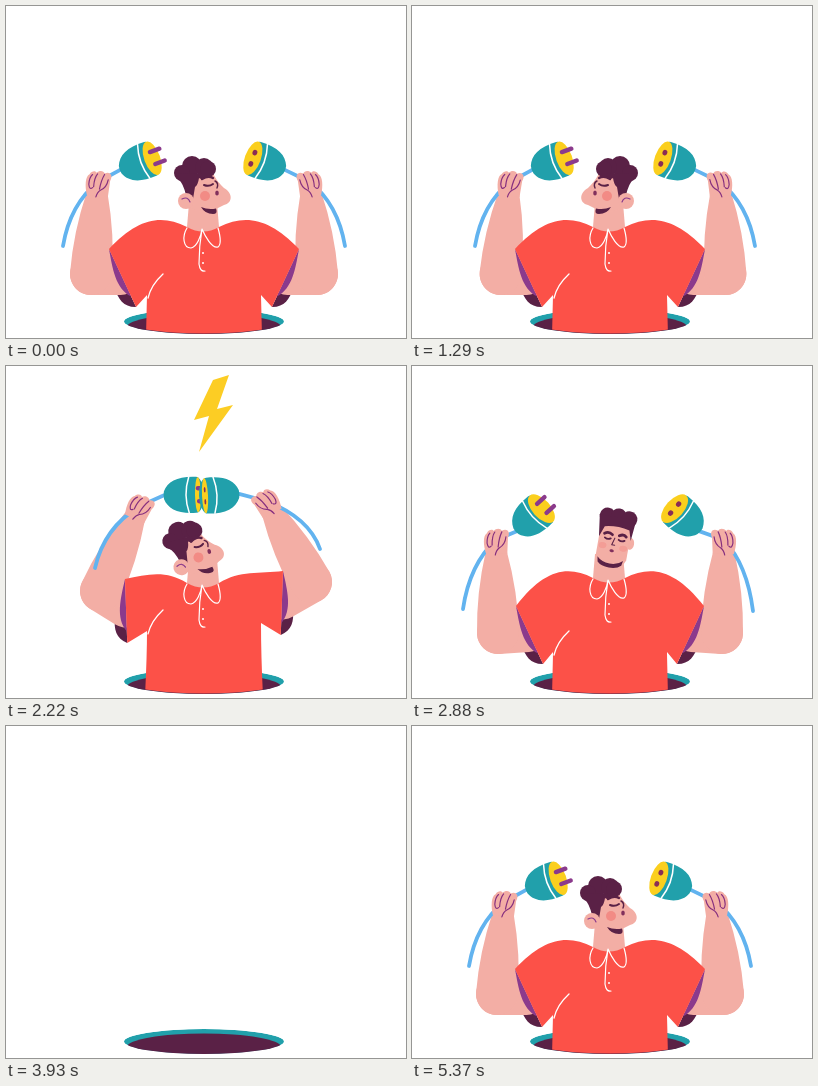
Write an HTML page that moves like this. It is 400x332 px and loops after 5.4 s.

```html
<!DOCTYPE html>
<html lang="en">
<head>
<meta charset="utf-8">
<title>Plug and socket</title>
<style>
html, body { margin: 0; width: 100%; height: 100%; overflow: hidden; background: #fff; }
svg { display: block; width: 100vw; height: 100vh; }
</style>
</head>
<body>
<svg id="stage" viewBox="0 0 400 332" fill="none" stroke-linecap="round" stroke-linejoin="round">
  <defs>
    <clipPath id="aboveHole"><path d="M-50 -200H450V315H278A80 12.5 0 0 1 118 315H-50Z"/></clipPath>
    <clipPath id="holeShape"><ellipse cx="198" cy="315.5" rx="80" ry="12.5"/></clipPath>
  </defs>
  <g id="hole" clip-path="url(#holeShape)">
    <ellipse cx="198" cy="315.5" rx="80" ry="12.5" fill="#21a0ab"/>
    <ellipse cx="198" cy="321" rx="77" ry="13.5" fill="#5a2146"/>
  </g>
  <g clip-path="url(#aboveHole)"><g id="man"></g></g>
  <polygon id="bolt" points="207,14 223,9 211,43 227,39 193,86 203,50 188,54" fill="#fccd24"/>
</svg>
<script>
const LOOP = 5400, STEP = 30, MID = 198;
const SKIN = '#f3aea5', RED = '#fc5148', TEAL = '#21a0ab', YELLOW = '#fbcf1e',
      BLUE = '#62b3ef', DARK = '#5a2146', PURPLE = '#8b3a8c';

// Each pose describes the left side; the right side mirrors it except for its overrides.
const POSES = {
  rest: {
    top: 215, half: 57, hem: 58,
    left: { hand: [92, 176], elbow: [85, 268], plug: [133, 157], tilt: -20, face: 8, cord: [57, 240], bend: 1, sleeve: [103, 243], cuff: 65 },
    right: { plug: [136, 157] }
  },
  join: {
    top: 211, half: 57, hem: 59,
    left: { hand: [134, 140], elbow: [95, 225], plug: [178, 129], tilt: -1, face: 3, cord: [89, 202], bend: 1, sleeve: [119, 213], cuff: 88 },
    right: { hand: [136, 135], elbow: [91, 216], plug: [183, 129], tilt: 3, cord: [82, 183], sleeve: [119, 205] }
  },
  droop: {
    top: 206, half: 57, hem: 58,
    left: { hand: [84, 174], elbow: [86, 267], plug: [119, 152], tilt: -42, face: 9, cord: [51, 243], bend: 1, sleeve: [104, 240], cuff: 65 },
    right: { plug: [123, 152], cord: [55, 245] }
  },
  rise: {
    top: 196, half: 57, hem: 65,
    left: { hand: [107, 160], elbow: [102, 247], plug: [143, 136], tilt: -50, face: 9, cord: [61, 206], bend: 0, sleeve: [118, 226], cuff: 71 },
    right: { hand: [104, 161], elbow: [100, 247], plug: [139, 136], cord: [57, 210] }
  },
  tuck: {
    top: 250, half: 36, hem: 36,
    left: { hand: [145, 217], elbow: [147, 310], plug: [182, 202], tilt: 10, face: 10, cord: [119, 286], bend: 1, sleeve: [163, 252], cuff: 89 },
    right: { hand: [133, 216], elbow: [134, 310], plug: [168, 207], tilt: 26, cord: [118, 281], sleeve: [152, 252] }
  },
  wide: {
    top: 204, half: 58, hem: 58,
    left: { hand: [62, 158], elbow: [75, 260], plug: [98, 125], tilt: -40, face: 8, cord: [20, 225], bend: 1, sleeve: [98, 238], cuff: 62 }
  }
};
for (const pose of Object.values(POSES)) pose.right = { ...pose.left, ...pose.right };

// time, pose, head turn, left sway, right sway, head lean, drop
const KEYS = [
  [0, 'rest', 1, 0, 0, 0, 0],
  [240, 'rest', 1, -3, 20, 0, 0],
  [540, 'rest', 1, 0, 0, 0, 0],
  [720, 'rest', -1, -18, 1, 0, 0],
  [900, 'rest', -1, -17, 1, 0, 0],
  [1140, 'rest', -1, 3, 4, 0, 0],
  [1290, 'rest', -1, 6, 4, 0, 0],
  [1380, 'rest', -1, 0, 0, 0, 0],
  [1560, 'join', 1, 0, 0, -15, 0],
  [2300, 'join', 1, 0, 0, -15, 0],
  [2460, 'droop', 0, 0, 8, 10, 0],
  [2700, 'droop', 0, 0, 0, 10, 0],
  [3420, 'droop', 0, 0, 0, 10, 0],
  [3540, 'rise', 0, 0, 0, 0, 0],
  [3600, 'rise', 0, 0, 0, 0, -4],
  [3750, 'tuck', 0, 0, 0, 0, 10],
  [3870, 'tuck', 0, 0, 0, 0, 170],
  [4560, 'tuck', -1, 0, 0, 0, 170],
  [4650, 'tuck', -1, 0, 0, 0, 0],
  [4770, 'wide', 1, 0, 0, 0, 0],
  [5100, 'rest', 1, 0, 0, 0, 0],
  [LOOP, 'rest', 1, 0, 0, 0, 0]
];

const byId = id => document.getElementById(id);
const clamp = v => Math.max(0, Math.min(1, v));
const smooth = v => v * v * (3 - 2 * v);
const rad = deg => deg * Math.PI / 180;
const shape = (d, fill) => `<path d="${d}" fill="${fill}"/>`;
const line = (d, color, width) => `<path d="${d}" stroke="${color}" stroke-width="${width}"/>`;
const dot = (x, y, rx, fill, ry = rx) => `<ellipse cx="${x}" cy="${y}" rx="${rx}" ry="${ry}" fill="${fill}"/>`;
const group = (transform, content) => `<g transform="${transform}">${content}</g>`;
const polar = ([x, y], deg, r) => [x + r * Math.cos(rad(deg)), y + r * Math.sin(rad(deg))];
const flip = ([x, y]) => [2 * MID - x, y];

// Blends numbers, points and nested poses alike.
function lerp(a, b, k) {
  if (typeof a === 'number') return a + (b - a) * k;
  if (Array.isArray(a)) return a.map((v, i) => lerp(v, b[i], k));
  return Object.fromEntries(Object.keys(a).map(key => [key, lerp(a[key], b[key], k)]));
}

function poseAt(t) {
  let i = 0;
  while (i < KEYS.length - 2 && t >= KEYS[i + 1][0]) i++;
  const [from, to] = [KEYS[i], KEYS[i + 1]];
  const k = smooth(clamp((t - from[0]) / (to[0] - from[0])));
  const pose = lerp(POSES[from[1]], POSES[to[1]], k);
  const [turn, swayLeft, swayRight, lean, drop] = lerp(from.slice(2), to.slice(2), k);
  return { ...pose, turn, swayLeft, swayRight, lean, drop };
}

// A limb segment with round ends; bulge swells its sides.
function taper([ax, ay], ra, [bx, by], rb, bulge = 0) {
  const len = Math.hypot(bx - ax, by - ay) || 1;
  const nx = (ay - by) / len, ny = (bx - ax) / len;
  const mx = (ax + bx) / 2, my = (ay + by) / 2, rm = (ra + rb) / 2 + bulge;
  return shape(`M${ax + nx * ra} ${ay + ny * ra}Q${mx + nx * rm} ${my + ny * rm} ${bx + nx * rb} ${by + ny * rb}` +
    `A${rb} ${rb} 0 0 0 ${bx - nx * rb} ${by - ny * rb}Q${mx - nx * rm} ${my - ny * rm} ${ax - nx * ra} ${ay - ny * ra}` +
    `A${ra} ${ra} 0 0 0 ${ax + nx * ra} ${ay + ny * ra}Z`, SKIN);
}

function limb(side, shift) {
  const move = ([x, y], k = 1) => [x + shift * k, y];
  const cuffEnd = polar(side.sleeve, side.cuff, 64);
  return { ...side, cuffEnd, hand: move(side.hand), elbow: move(side.elbow, .6),
    plug: move(side.plug), cord: move(side.cord), shoulder: lerp(side.sleeve, cuffEnd, .43) };
}

function arm(l) {
  const { sleeve: s, cuffEnd: e, cuff } = l;
  const bulge = (k, r) => polar(lerp(s, e, k), cuff + 90, r);
  const low = lerp(s, e, .82);
  const wrist = lerp(l.hand, l.elbow, .12);
  return shape(`M${s}C${bulge(.4, 8)} ${bulge(.85, 22)} ${e}Z`, DARK) +
    taper(l.elbow, 21, l.shoulder, 21) + taper(l.elbow, 21, wrist, 10.5, 5) +
    shape(`M${s}C${bulge(.3, 5)} ${bulge(.6, 11)} ${low}Z`, PURPLE);
}

function device(l, hasProngs) {
  const { hand: h, cord: c, plug: p, face } = l;
  const back = polar(p, l.tilt, -20);
  const control = lerp(lerp(h, c, .5), [lerp(c[0], h[0], .2), lerp(h[1], c[1], .35)], l.bend);
  const holeWidth = Math.min(face * .3, 2.5);
  const detail = hasProngs
    ? line('M14 -6.5H24M15 6.5H25', PURPLE, 4.4)
    : dot(14, -6, holeWidth, '#8a2d55', 2.8) + dot(14, 6, holeWidth, '#8a2d55', 2.8);
  return line(`M${back}L${h}Q${control} ${c}`, BLUE, 3.8) +
    group(`translate(${p}) rotate(${l.tilt})`,
      shape('M-20 -4C-16 -14 -6 -19 12 -18A8 18 0 0 1 12 18C-6 19 -16 14 -20 4Q-21 0 -20 -4Z', TEAL) +
      line('M5 -18Q-1 0 5 18', '#fff', 1.5) +
      dot(14, 0, face, YELLOW, 17.5) + detail);
}

function hand(l) {
  const angle = Math.atan2(l.hand[1] - l.elbow[1], l.hand[0] - l.elbow[0]) * 180 / Math.PI + 90;
  return group(`translate(${l.hand}) rotate(${angle})`,
    shape('M-10 14C-13 5 -13 -5 -9 -7C-7 -11 -3 -11 -2 -9C0 -12 5 -12 6 -9C11 -12 15 -8 12 -2L11 14Z', SKIN) +
    line('M-9 3Q-9 -4 -6 -7M-4 5Q-4 -4 -1 -8M2 7Q3 -2 6 -8M-9 3Q-8 9 -5 6M-1 15Q0 10 3 8Q9 5 10 -3', '#87307f', 1.2));
}

function shirt(pose, l, r) {
  const { top, half, hem } = pose;
  const rs = flip(r.sleeve), re = flip(r.cuffEnd);
  const pit = [MID - half, l.cuffEnd[1] - 12], rp = [MID + half, r.cuffEnd[1] - 12];
  const along = (edge, end, k, dy) => [lerp(edge, end[0], k), top + dy];
  return shape(`M181 ${top + 6}C${along(181, l.sleeve, .33, -7)} ${along(181, l.sleeve, .63, -3)} ${l.sleeve}` +
      `L${l.cuffEnd}L${pit}Q${MID - half} 290 ${MID - hem} 330H${MID + hem}Q${MID + half} 290 ${rp}L${re}L${rs}` +
      `C${along(213, rs, .63, -3)} ${along(213, rs, .33, -7)} 213 ${top + 6}Z`, RED) +
    line(`M${pit[0] + 1} ${pit[1] + 3}Q${pit[0] + 4} ${pit[1] - 10} ${pit[0] + 16} ${pit[1] - 21}`, '#fff', 1.3);
}

function collar(top) {
  return group(`translate(196 ${top})`,
    line('M-15 7C-20 15 -19 27 -11 27C-5 26 -1 15 0 8C3 15 10 28 16 26C20 23 18 14 16 7M0 8C-3 25 -3 38 -3 43Q-2 51 3 50', '#fff', 1.2) +
    dot(1, 32, 1, '#fff') + dot(1, 42, 1, '#fff'));
}

function neck(top) {
  return shape(`M183 ${top - 18}H211L213 ${top + 6}Q197 ${top + 15} 181 ${top + 6}Z`, SKIN);
}

function sideHead() {
  return shape('M-13 -18L10 -22C13 -15 17 -11 21 -7C30 -2 30 8 21 10L13 14C8 18 -8 18 -14 11Z', SKIN) +
    shape('M-2 12Q5 15 13 13.5Q15 19 10 19Q2 19 -2 12Z', DARK) +
    dot(-11, -29, 10, DARK) + dot(-21, -22, 8, DARK) + dot(1, -28, 9, DARK) + dot(5, -26, 8, DARK) +
    shape('M-28 -22L9 -21Q0 -14 -4 -17Q-5 -10 -8 -8L-10 4L-17 0Q-20 -12 -24 -15Z', DARK) +
    dot(-17, 6, 8, SKIN) + line('M-21 4Q-15 1 -13 7', PURPLE, 1.2) +
    dot(2, 1, 5, '#f28b85') +
    line('M-1 -16Q5 -20 10 -17', DARK, 2.4) + line('M1 -10Q6 -8 10 -11', DARK, 2) +
    line('M12 -14Q16 -12 14 -7', DARK, 1.4) +
    dot(14, -2, 1.8, '#81305c', 2.5);
}

function frontHead() {
  return dot(16, -5, 4, SKIN, 6) +
    shape('M-16 -24H15V12Q12 22 0 22Q-13 22 -16 13Z', SKIN) +
    shape('M-14 13Q-9 18 -1 18Q7 18 12 13L11 18Q7 22 -1 22Q-9 22 -13 18Z', DARK) +
    dot(-11, -29, 8, DARK) + dot(0, -30, 8, DARK) + dot(11, -29, 8, DARK) +
    shape('M-19 -29H18L16 -8L13 -18Q0 -21 -12 -18L-16 -7Z', DARK) +
    dot(-11, 1, 4, '#f39d96', 3) + dot(10, 1, 4, '#f39d96', 3) +
    line('M-11 -11Q-7 -14 -3 -11M4 -11Q8 -14 11 -11', DARK, 2.8) +
    line('M-10 -7Q-7 -5 -4 -7M4 -7Q7 -5 10 -7', DARK, 1.8) +
    line('M0 -8L-2 -1H1', DARK, 1.1) + dot(-1, 5, 2.2, '#81305c', 1.4);
}

function head(pose) {
  const side = Math.abs(pose.turn) > .4;
  const content = side ? group(`scale(${Math.sign(pose.turn)} 1)`, sideHead()) : frontHead();
  const x = 197 + pose.lean * .45, y = pose.top - 26 + Math.max(0, -pose.lean) * .4;
  return group(`translate(${x} ${y}) rotate(${pose.lean})`, content);
}

function render(t) {
  const pose = poseAt(t);
  const joined = t > 1590 && t < 2310;
  const shake = joined ? 2 * Math.sin((t - 2220) / 60 * Math.PI + (t - 2220) / 90) : 0;
  const l = limb(pose.left, pose.swayLeft + shake), r = limb(pose.right, -pose.swayRight - shake);
  const mirror = content => group(`matrix(-1 0 0 1 ${2 * MID} 0)`, content);

  byId('man').setAttribute('transform', `translate(0 ${pose.drop})`);
  byId('man').innerHTML = arm(l) + mirror(arm(r)) + shirt(pose, l, r) + neck(pose.top) +
    collar(pose.top) + head(pose) + device(l, true) + mirror(device(r, false)) +
    hand(l) + mirror(hand(r));

  const open = 1 - smooth(clamp((t - 4000) / 140)) + smooth(clamp((t - 4420) / 140));
  byId('hole').setAttribute('transform', `translate(198 315.5) scale(${open}) translate(-198 -315.5)`);

  const pulse = .96 + .04 * Math.cos((t - 2220) / 60 * Math.PI);
  byId('bolt').setAttribute('transform', `translate(207 47) scale(${pulse}) translate(-207 -47)`);
  byId('bolt').setAttribute('visibility', joined ? 'visible' : 'hidden');
}

const start = performance.now();
function tick() {
  const elapsed = (performance.now() - start) % LOOP;
  render(Math.floor(elapsed / STEP) * STEP);
  requestAnimationFrame(tick);
}
tick();
</script>
</body>
</html>
```
